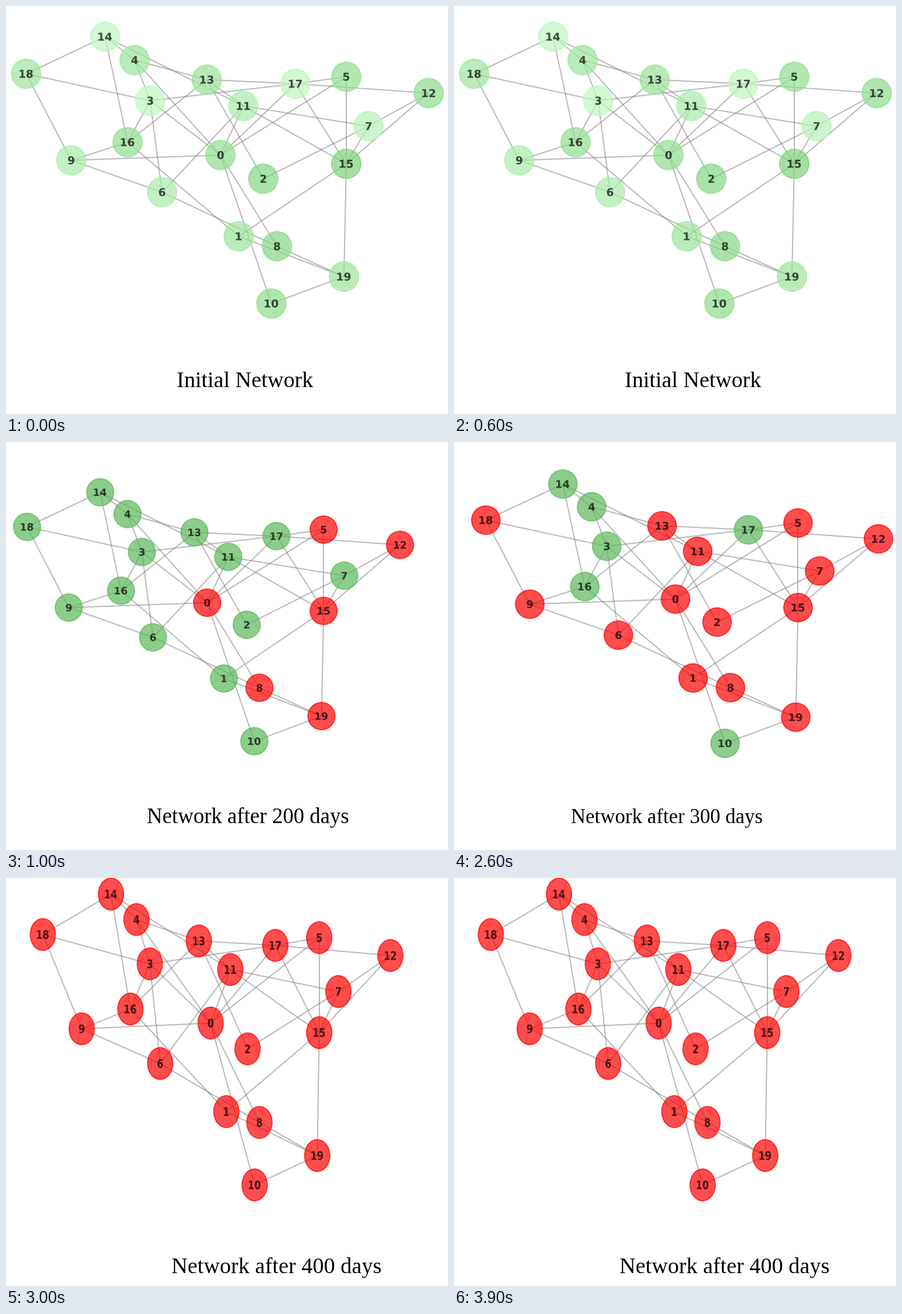
Write a matplotlib script that moves like this. It is 756x698 px and loops after 4500 ms.

```python
import matplotlib.pyplot as plt
from matplotlib.animation import FuncAnimation
from matplotlib.collections import LineCollection
from matplotlib.patches import Circle, PathPatch
from matplotlib.textpath import TextPath
from matplotlib.transforms import Affine2D

WIDTH, HEIGHT, DPI = 756, 698, 64
PX = 72 / DPI  # points per pixel
RADIUS, LABEL_SIZE, ALPHA = 25, 18.5, 0.7
RED, GREEN = (1, 0, 0), (0.36, 0.72, 0.36)
PALE, DEEP = (0.75, 0.965, 0.75), (0.455, 0.808, 0.455)

# x, y and initial shade (0 pale, 1 deep) of each node
NODES = [
    (367, 255, 0.6), (398, 394, 0.45), (440, 295.5, 0.8), (246.5, 162, 0),
    (220, 92.5, 0.45), (582, 121, 0.6), (267, 318.5, 0.28), (620, 205.5, 0.1),
    (463.5, 411, 0.75), (111.5, 264, 0.25), (454, 509, 0.65), (406, 171, 0.25),
    (723, 149, 0.65), (343.5, 126, 0.5), (169.5, 52.5, 0), (582, 270, 0.9),
    (208, 233, 0.6), (495, 133, 0), (34.5, 116, 0.45), (578, 463, 0.45),
]
LINKS = {
    0: [3, 4, 5, 8, 9, 10, 11, 17], 1: [15, 16, 19], 2: [7, 13],
    3: [4, 6, 16, 17, 18], 4: [13, 14], 5: [15, 17], 6: [8, 9, 11],
    7: [11, 12, 15], 8: [19], 9: [16, 18], 10: [19], 11: [13, 14, 15],
    12: [15, 17], 13: [16, 17], 14: [16, 18], 15: [17, 19],
}
EVERYONE = set(range(len(NODES)))

fig = plt.figure(figsize=(WIDTH / DPI, HEIGHT / DPI), dpi=DPI, facecolor="white")
ax = fig.add_axes([0, 0, 1, 1])
ax.set(xlim=(0, WIDTH), ylim=(HEIGHT, 0))
ax.axis("off")


def initial_color(node):
    shade = NODES[node][2]
    return tuple(p + (d - p) * shade for p, d in zip(PALE, DEEP))


def label_path(text, x, y):
    path = TextPath((0, 0), text, size=LABEL_SIZE,
                    prop={"family": "DejaVu Sans", "weight": "bold"})
    box = path.get_extents()
    center = Affine2D().translate(-(box.x0 + box.x1) / 2, -(box.y0 + box.y1) / 2)
    return path.transformed(center.scale(1, -1).translate(x, y))


def build_scene(scale, shift, infected, caption, caption_at, caption_size):
    """Draw one state of the network and return its artists."""
    place = Affine2D().scale(*scale).translate(*shift)
    to_screen = place + ax.transData
    segments = [place.transform([NODES[a][:2], NODES[b][:2]])
                for a, others in LINKS.items() for b in others]
    artists = [ax.add_collection(LineCollection(
        segments, colors="gray", alpha=0.55, linewidths=2 * PX, zorder=1))]

    for node, (x, y, _) in enumerate(NODES):
        if infected is None:
            color = initial_color(node)
        else:
            color = RED if node in infected else GREEN
        artists.append(ax.add_patch(Circle(
            (x, y), RADIUS, facecolor=color, edgecolor=color, alpha=ALPHA,
            linewidth=1.9 * PX, transform=to_screen, zorder=2)))
        artists.append(ax.add_patch(PathPatch(
            label_path(str(node), x, y), facecolor="black", linewidth=0,
            alpha=ALPHA, transform=to_screen, zorder=3)))

    artists.append(ax.text(*caption_at, caption, family="Liberation Serif",
                           size=caption_size * PX, color="black",
                           ha="left", va="baseline"))
    return artists


scenes = [
    build_scene((1, 1), (0, 0), None, "Initial Network", (292.3, 652), 38),
    build_scene((0.9266, 0.933), (4.03, 37), {0, 5, 8, 12, 15, 19},
                "Network after 200 days", (240.6, 652), 36.7),
    build_scene((0.9753, 0.9715), (20.85, 21), EVERYONE - {3, 4, 10, 14, 16, 17},
                "Network after 300 days", (200, 652.5), 34.7),
    build_scene((0.8635, 1.0898), (33.2, -29.7), EVERYONE,
                "Network after 400 days", (282.6, 676.5), 38.1),
]
TIMELINE = [0, 0, 1, 1, 2, 2, 3, 3, 3]  # scene for each half second


def update(frame):
    for index, artists in enumerate(scenes):
        for artist in artists:
            artist.set_visible(index == TIMELINE[frame])
    return []


anim = FuncAnimation(fig, update, frames=len(TIMELINE), interval=500,
                     repeat=True, repeat_delay=0, blit=False)
plt.show()
```
